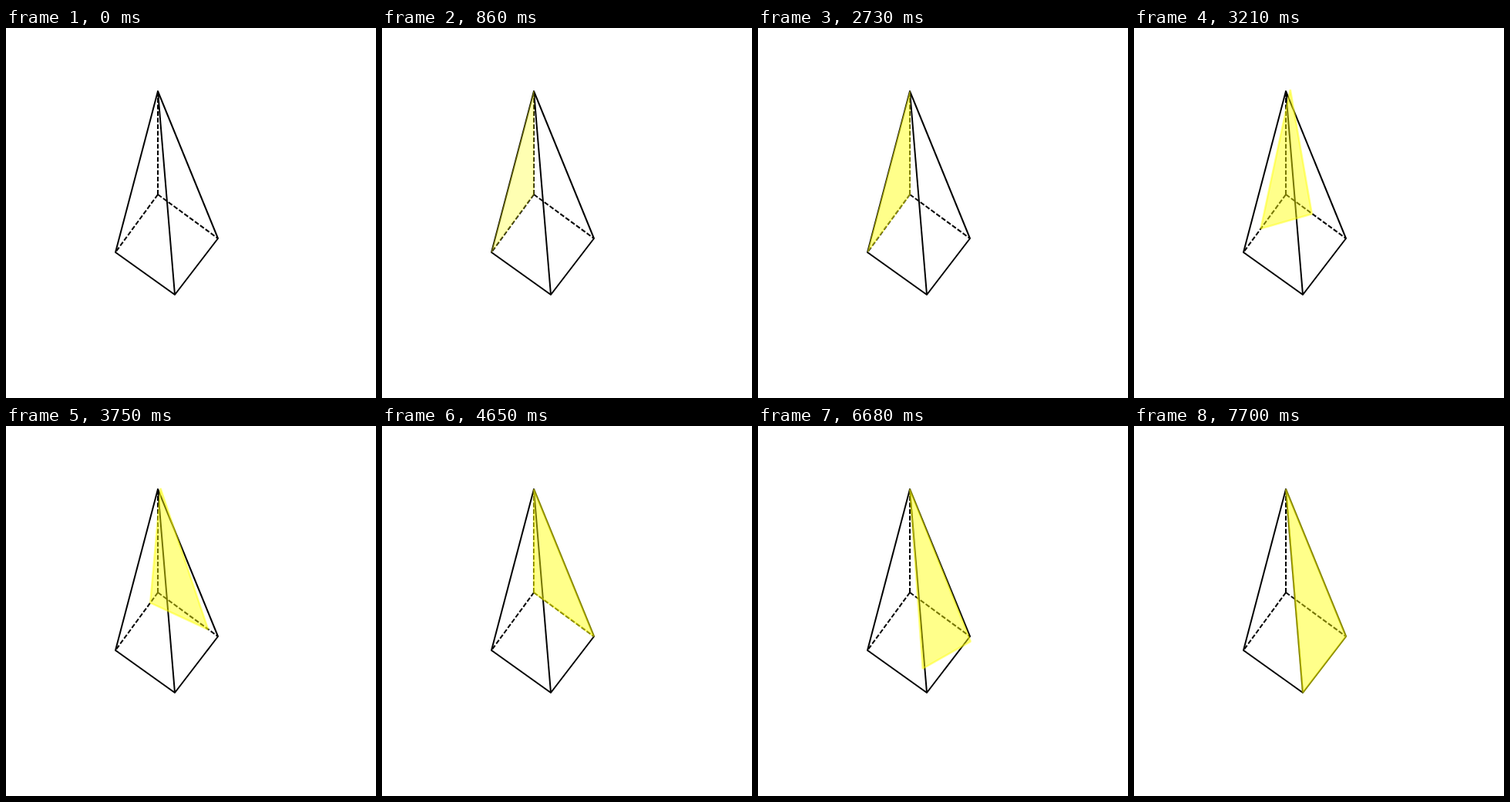
An HTML page that plays this animation: 480 px wide and 480 px high, repeating every 8000 ms.

```html
<!DOCTYPE html>
<html lang="en">
<head>
<meta charset="utf-8">
<title>Pyramid faces</title>
<style>
  html, body { margin: 0; width: 100%; height: 100%; overflow: hidden; background: #fff; }
  svg { display: block; width: 100vw; height: 100vh; }
  .edges { fill: none; stroke: #000; stroke-width: 2; stroke-linejoin: round; }
  .hidden { stroke-dasharray: 6 2.5; }
  #face { fill: #ff0; fill-opacity: .46; stroke: #ff0; stroke-opacity: .46; stroke-linejoin: bevel; }
</style>
</head>
<body>
<svg viewBox="0 0 480 480">
  <path class="edges hidden" d="M197 216V82M197 216L142 291M197 216L275 273"/>
  <path class="edges" d="M197 82L142 291L219 346L275 273ZL219 346"/>
  <polygon id="face"/>
</svg>
<script>
const LOOP = 8000, STEP = 60;
const top_ = [197, 82], back = [197, 216], left = [142, 291], right = [275, 273], front = [219, 346];
const face = document.getElementById('face');

// Cubic Bézier easing (.25, .1, .25, 1), solved by bisection.
function ease(x) {
  if (x <= 0 || x >= 1) return x <= 0 ? 0 : 1;
  const curve = (s, a, b) => 3 * s * (1 - s) ** 2 * a + 3 * s * s * (1 - s) * b + s ** 3;
  let lo = 0, hi = 1;
  for (let i = 0; i < 24; i++) {
    const mid = (lo + hi) / 2;
    if (curve(mid, .25, .25) < x) lo = mid; else hi = mid;
  }
  return curve(lo, .1, 1);
}

// Eased progress, advancing in the animation's 60 ms steps.
function progress(t, start, length) {
  if (t < start) return 0;
  return ease((Math.floor((t - start) / STEP) * STEP + 20) / length);
}

// Blend two points, with a sideways drift that vanishes at both ends.
function blend(a, b, p, drift = [0, 0]) {
  return a.map((v, i) => v + (b[i] - v) * p + drift[i] * 4 * p * (1 - p));
}

function draw(t) {
  const fade = progress(t, 500, 1000);
  const p = progress(t, 2730, 2000);
  const q = progress(t, 5780, 2000);
  const points = q > 0
    ? [top_, blend(back, front, q), blend(right, right, q, [1, 9])]
    : [blend(top_, top_, p, [6, -2]), blend(left, back, p), blend(back, right, p, [2, 2])];
  face.setAttribute('points', points.join(' '));
  face.setAttribute('opacity', fade);
  // The outline shows once the face starts to move.
  face.setAttribute('stroke-width', 1 + 1.5 * Math.min(1, p * 4));
}

function tick() {
  draw(performance.now() % LOOP);
  requestAnimationFrame(tick);
}
tick();
</script>
</body>
</html>
```
